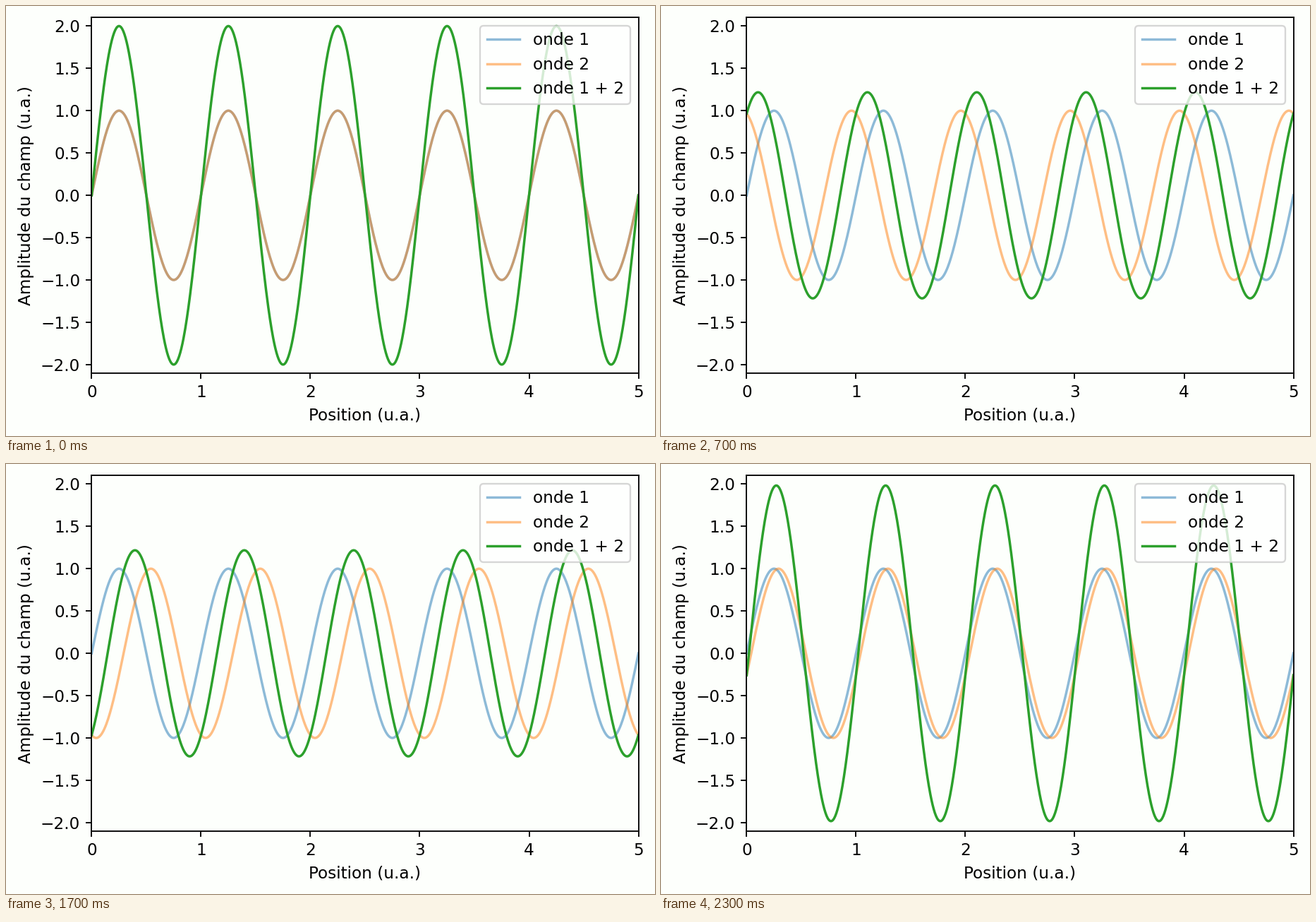
These frames come from a looping animation (920x609 px, 2400 ms). A matplotlib script:

```python
import numpy as np
import matplotlib.pyplot as plt
from matplotlib.animation import FuncAnimation

W, H = 920, 609
FRAMES = 24
PAPER = "#fdfffc"

plt.rcParams.update({"font.family": "DejaVu Sans", "font.size": 10})

fig = plt.figure(figsize=(5.52, 3.654), dpi=166.67, facecolor=PAPER)
ax = fig.add_axes([121.45 / W, 89.2 / H, 775.05 / W, 503.35 / H], facecolor=PAPER)
ax.set(xlim=(0, 5), ylim=(-2.1, 2.1),
       xlabel="Position (u.a.)", ylabel="Amplitude du champ (u.a.)")

x = np.linspace(0, 5, 1001)
fixed = np.sin(2 * np.pi * x)
ax.plot(x, fixed, color="tab:blue", alpha=0.5, label="onde 1")
moving_line, = ax.plot(x, fixed, color="tab:orange", alpha=0.5, label="onde 2")
sum_line, = ax.plot(x, 2 * fixed, color="tab:green", label="onde 1 + 2")
ax.legend(loc="upper right")


def update(k):
    """Shift the second wave by k/FRAMES of a period and redraw the sum."""
    moving = np.sin(2 * np.pi * (x + k / FRAMES))
    moving_line.set_ydata(moving)
    sum_line.set_ydata(fixed + moving)
    return moving_line, sum_line


anim = FuncAnimation(fig, update, frames=FRAMES, interval=100,
                     repeat=True, repeat_delay=0, blit=False)
plt.show()
```
